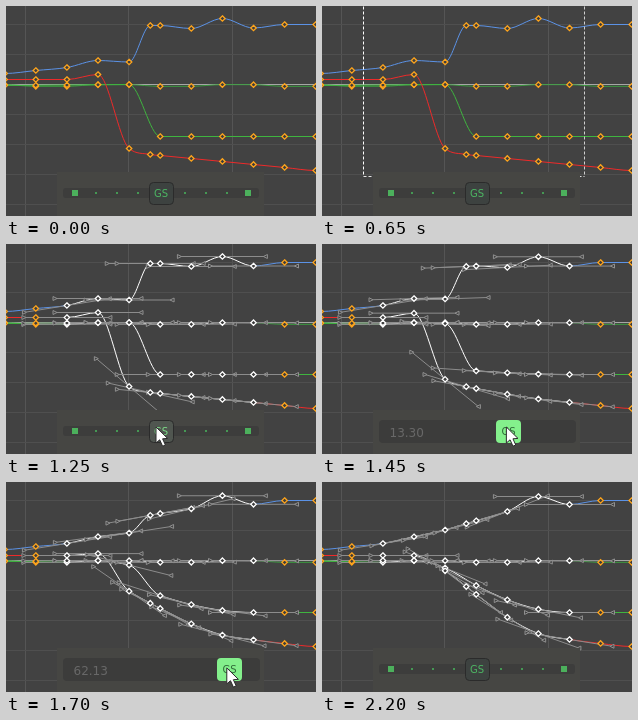
An HTML page with a canvas for the animation above (2.6 s loop, 310 by 210 pixels).

```html
<!DOCTYPE html>
<html lang="en">
<head>
<meta charset="utf-8">
<title>Smoothing animation curves</title>
<style>
  html, body { margin: 0; width: 100%; height: 100%; overflow: hidden; background: #424242; }
  canvas { display: block; width: 310px; height: 210px; }
</style>
</head>
<body>
<canvas id="stage" width="310" height="210"></canvas>
<script>
const ctx = document.getElementById('stage').getContext('2d');
const LOOP = 2600, STEP = 50, HANDLE = 43;

// Times (ms) at which the picture changes mode
const DRAG = 150, SELECT = 700, ENTER = 900, HOVER = 1200, PRESS = 1300, LEAVE = 1900, RELEASE = 2150;

// Keys sit on evenly spaced columns; some curves have one extra key
const COLUMNS = 11, EXTRA = 4.68, FIRST = 2, LAST = 8;
const columnX = c => 31.1 * c - 1.8;

const clamp = v => Math.min(1, Math.max(0, v));
const mix = (a, b, k) => a + (b - a) * k;
const progress = (t, from, to) => clamp((t - from) / (to - from));

// Straight lines through [column, y] points
const through = (...points) => c => {
  const i = Math.max(1, points.findIndex(p => p[0] >= c));
  const [a, b] = [points[i - 1], points[i]];
  return mix(a[1], b[1], progress(c, a[0], b[0]));
};

// Soft S-shaped rise that ends at the last selected column
const rise = (start, low, high, power) => c =>
  mix(low, high, Math.sin(progress(c, start, LAST) * Math.PI / 2) ** power);

const ripple = c => 79 + 1.2 * Math.cos((c - 1.48) * Math.PI / 2);

const curves = [
  { color: '#3a9a3e', from: ripple, to: ripple },
  { color: '#3fb43f',
    from: through([0, 79], [4, 78], [5, 130], [10, 130]),
    to: rise(3.6, 78, 130, 1) },
  { color: '#ee2a2a', extra: true,
    from: through([0, 73], [2, 73], [3, 68], [4, 142], [EXTRA, 148], [10, 164]),
    to: rise(3, 73, 157, 1.45) },
  { color: '#5b92e6', extra: true,
    from: through([0, 67], [2, 61], [3, 54], [4, 55.5], [EXTRA, 19], [5, 19], [6, 22],
      [7, 12], [8, 21.5], [9, 18], [10, 18]),
    to: through([2, 61], [4, 47.5], [6, 29], [7, 14], [8, 22]) }
];

// Slopes that never overshoot the neighbouring keys
function addSlopes(keys) {
  keys.forEach((k, i) => {
    k.m = 0;
    const p = keys[i - 1], n = keys[i + 1];
    if (!p || !n) return;
    const before = (k.y - p.y) / (k.x - p.x);
    const after = (n.y - k.y) / (n.x - k.x);
    if (before * after <= 0) return;
    const middle = Math.abs((n.y - p.y) / (n.x - p.x));
    const limit = 3 * Math.min(Math.abs(before), Math.abs(after));
    k.m = Math.sign(before) * Math.min(middle, limit);
  });
  return keys;
}

function makeKeys({ from, to, extra }, smooth) {
  const columns = Array.from({ length: COLUMNS }, (_, i) => i);
  if (extra) columns.splice(5, 0, EXTRA);
  return addSlopes(columns.map(c => {
    const inside = c >= FIRST && c <= LAST;
    return { x: columnX(c), y: (smooth && inside ? to : from)(c), inside };
  }));
}

for (const curve of curves) {
  curve.rough = makeKeys(curve, false);
  curve.smooth = makeKeys(curve, true);
}

const blend = ({ rough, smooth }, amount) => rough.map((k, i) => ({
  x: k.x + 0.5,
  y: mix(k.y, smooth[i].y, amount) + 0.5,
  m: mix(k.m, smooth[i].m, amount),
  inside: k.inside
}));

function line(x1, y1, x2, y2, color) {
  ctx.strokeStyle = color;
  ctx.beginPath();
  ctx.moveTo(x1, y1);
  ctx.lineTo(x2, y2);
  ctx.stroke();
}

function box(x, y, w, h, r, fill, stroke) {
  ctx.beginPath();
  ctx.roundRect(x, y, w, h, r);
  ctx.fillStyle = fill;
  ctx.fill();
  if (stroke) {
    ctx.strokeStyle = stroke;
    ctx.stroke();
  }
}

function polygon(points, fill, stroke) {
  ctx.beginPath();
  points.forEach(([x, y]) => ctx.lineTo(x, y));
  ctx.closePath();
  ctx.fillStyle = fill;
  ctx.fill();
  ctx.strokeStyle = stroke;
  ctx.stroke();
}

function drawGrid() {
  ctx.fillStyle = '#424242';
  ctx.fillRect(0, 0, 310, 210);
  for (let i = 0; i < 3; i++) {
    const x = Math.floor(19 + 103.5 * i) + 0.5;
    line(x, 0, x, 210, '#555555');
  }
  for (let y = 18.5; y < 210; y += 30) line(0, y, 310, y, '#4f4f4f');
  line(0, 78.5, 310, 78.5, '#a6a6a6');
}

function drawCurve(keys, color, selected) {
  for (let i = 1; i < keys.length; i++) {
    const a = keys[i - 1], b = keys[i], d = (b.x - a.x) / 3;
    ctx.strokeStyle = selected && a.inside && b.inside ? '#ffffff' : color;
    ctx.beginPath();
    ctx.moveTo(a.x, a.y);
    ctx.bezierCurveTo(a.x + d, a.y + a.m * d, b.x - d, b.y - b.m * d, b.x, b.y);
    ctx.stroke();
  }
}

function drawHandles({ x, y, m }) {
  const dx = HANDLE / Math.hypot(1, m), dy = dx * m;
  line(x - dx, y - dy, x + dx, y + dy, '#8c8c8c');
  for (const s of [-1, 1]) {
    const hx = x + s * dx, hy = y + s * dy;
    polygon([[hx - s * 2, hy], [hx + s * 2, hy - 2], [hx + s * 2, hy + 2]], '#424242', '#909090');
  }
}

function drawKey({ x, y, inside }, selected) {
  const r = 2.7;
  ctx.lineWidth = 1.3;
  polygon([[x, y - r], [x + r, y], [x, y + r], [x - r, y]],
    '#3c3c3c', selected && inside ? '#ffffff' : '#ffa51c');
  ctx.lineWidth = 1;
}

function drawGraph(t, amount) {
  const selected = t >= SELECT;
  const all = curves.map(c => blend(c, amount));
  all.forEach((keys, i) => drawCurve(keys, curves[i].color, selected));
  const keys = all.flat();
  if (selected) keys.filter(k => k.inside).forEach(drawHandles);
  keys.forEach(k => drawKey(k, selected));
}

function drawMarquee(t) {
  if (t < DRAG || t >= SELECT) return;
  const p = progress(t, DRAG, SELECT - STEP);
  const right = 262.5, bottom = 170.5;
  const left = Math.round(mix(262, 41, 1 - (1 - p) ** 1.32)) + 0.5;
  const top = Math.round(mix(170, -5, clamp(p * 3.3))) + 0.5;
  ctx.setLineDash([3, 2]);
  line(left, top, left, bottom, '#ffffff');
  line(left, top, right, top, '#e4e4e4');
  line(right, top, right, bottom, '#d0d0d0');
  line(left, bottom, right, bottom, '#e4e4e4');
  ctx.setLineDash([]);
}

function label(text, x, y, size, color, align) {
  ctx.font = `${size}px "DejaVu Sans", "Open Sans", sans-serif`;
  ctx.textAlign = align;
  ctx.fillStyle = color;
  ctx.fillText(text, x, y);
}

function drawSlider(slide) {
  const x = Math.round(155 + 86 * slide) + 0.5;
  box(57, 176, 197, 23, 4, '#3c3c3b');
  label((slide * slide * 100).toFixed(2), 67.5, 192.5, 12, '#686868', 'left');
  box(x - 12.5, 176, 25, 23, 4, '#84f08c');
  label('GS', x, 191, 10, '#2f6a38', 'center');
}

function drawRest(hover) {
  box(57, 182, 196, 10, 3, '#3d3d3c');
  for (const side of [-1, 1]) {
    for (let i = 0; i < 4; i++) {
      const x = 155.5 + side * (86.5 - 21 * i), size = i ? 2 : 6;
      ctx.fillStyle = i ? '#459854' : '#4cb05c';
      ctx.fillRect(Math.round(x - size / 2), 187 - size / 2, size, size);
    }
  }
  box(143.5, 176.5, 24, 22, 4, hover ? '#505650' : '#3d4240', '#2b2b2b');
  label('GS', 155, 190.7, 10, hover ? '#7ddc88' : '#4cb763', 'center');
}

function drawPanel(t, slide) {
  ctx.fillStyle = '#464643';
  ctx.fillRect(51, 166, 207, 44);
  if (t >= PRESS && t < RELEASE) drawSlider(clamp(slide));
  else drawRest(t >= HOVER && t < PRESS);
}

function drawCursor(t, slide) {
  if (t < ENTER || t >= LEAVE) return;
  const p = progress(t, ENTER, PRESS - STEP);
  const dragging = t >= PRESS;
  const x = dragging ? 153 + 86 * slide : mix(244, 150, p);
  const y = dragging ? Math.max(183, 180.4 + 7 * slide) : mix(165, 183, p);
  ctx.save();
  ctx.translate(x, y);
  if (y < 172) ctx.scale(0.72, 0.6);
  polygon([[0, 0], [0, 16], [3.7, 12.8], [6.6, 19.2], [9.4, 18], [6.6, 11.8], [11.6, 11.4]],
    '#ffffff', '#2a2a2a');
  ctx.restore();
}

function draw(now) {
  const t = Math.floor((now % LOOP) / STEP) * STEP;
  // The button moves steadily; strength grows with its square
  const slide = t < PRESS ? 0 : 0.36469 + (t - 1450) * 0.00169416;
  ctx.lineWidth = 1;
  drawGrid();
  drawGraph(t, clamp(slide) ** 2);
  drawMarquee(t);
  drawPanel(t, slide);
  drawCursor(t, slide);
}

const start = performance.now();
function tick() {
  draw(performance.now() - start);
  requestAnimationFrame(tick);
}
tick();
</script>
</body>
</html>
```
